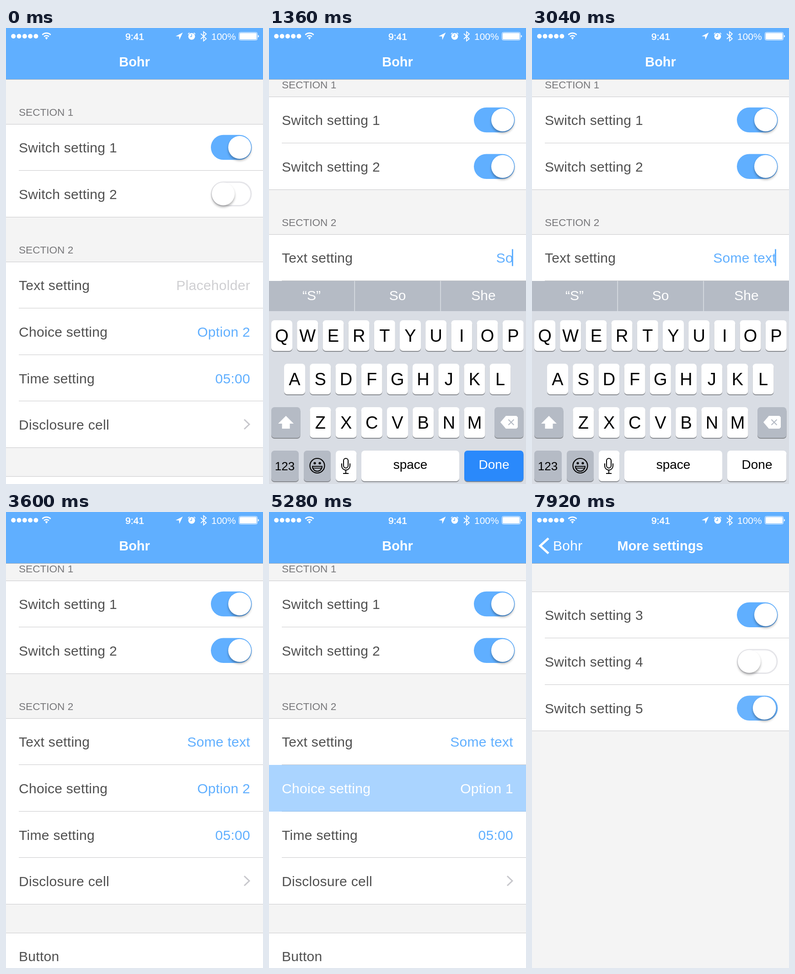
Animation, 562 px wide and 997 px high, one loop 8000 ms. Source, as an HTML page with a canvas:

```html
<!DOCTYPE html>
<html lang="en">
<head>
<meta charset="utf-8">
<title>Settings</title>
<style>
  html, body { margin: 0; height: 100%; overflow: hidden; background: #f4f4f4; }
  canvas { display: block; width: 100vw; height: 100vh; }
</style>
</head>
<body>
<canvas id="stage" width="562" height="997"></canvas>
<script>
const W = 562, H = 997, LOOP = 8000, ROW = 101.5;
const BLUE = '#60afff', INK = '#505050', LINE = '#c9c9cb', PALE = '#f4f4f4', GREY = '#b5bbc5';
const c = document.getElementById('stage').getContext('2d');

// --- timing helpers ---
const clamp = v => Math.max(0, Math.min(1, v));
const mix = (a, b, p) => a + (b - a) * p;
const smooth = (t, a, b) => { const p = clamp((t - a) / (b - a)); return p * p * (3 - 2 * p); };
const spring = (t, start) => { const x = Math.max(0, t - start) * .0194; return 1 - (1 + x) * Math.exp(-x); };

// --- drawing helpers ---
function rect(x, y, w, h, fill) { c.fillStyle = fill; c.fillRect(x, y, w, h); }
function round(x, y, w, h, r, fill) {
  c.beginPath(); c.roundRect(x, y, w, h, r); c.fillStyle = fill; c.fill();
}
function disc(x, y, r, fill) { c.beginPath(); c.arc(x, y, r, 0, 7); c.fillStyle = fill; c.fill(); }
function path(pts, color, width) {
  c.beginPath();
  pts.forEach(([x, y]) => c.lineTo(x, y));
  if (width) { c.strokeStyle = color; c.lineWidth = width; c.stroke(); }
  else { c.fillStyle = color; c.fill(); }
}
function arc(x, y, r, a, b, color, width) {
  c.beginPath(); c.arc(x, y, r, a, b); c.strokeStyle = color; c.lineWidth = width; c.stroke();
}
function text(s, x, y, size, color, align = 'left', weight = '', gap = 0) {
  c.font = `${weight} ${size}px "Liberation Sans", Arial, sans-serif`;
  c.letterSpacing = gap + 'px';
  c.textAlign = align;
  c.fillStyle = color;
  c.fillText(s, x, y);
}
function shadow(blur, y, color) { c.shadowBlur = blur; c.shadowOffsetY = y; c.shadowColor = color; }
const noShadow = () => shadow(0, 0, 'transparent');

// --- table parts ---
function toggle(y, from, t, tap) {
  const p = mix(from, 1 - from, spring(t, tap + 100));
  const press = smooth(t, tap, tap + 120) * (1 - spring(t, tap + 100));
  const x = 448, top = y - 27, w = 89.5, h = 54.5;
  round(x, top, w, h, h / 2, `rgb(${mix(229, 96, p)},${mix(229, 175, p)},${mix(233, 255, p)})`);
  const k = (1 - p) * (1 - press);
  if (k > .01) {
    const iw = (w - 6) * k, ih = (h - 6) * k;
    round(x + w / 2 - iw / 2, top + h / 2 - ih / 2, iw, ih, ih / 2, '#fff');
  }
  const stretch = 12 * press;
  shadow(5, 4, 'rgba(0,0,0,.3)');
  round(mix(450, 486, p) - stretch * p, y - 24.8, 50 + stretch, 50, 25, '#fff');
  noShadow();
}

function group(top, count) {
  rect(0, top, W, count * ROW, '#fff');
  for (let i = 0; i <= count; i++) {
    const x = i && i < count ? 28 : 0;
    rect(x, Math.floor(top + i * ROW), W, 1, LINE);
  }
}

const label = (s, y, color = INK) => text(s, 28, y + 10.5, 30, color, 'left', '', .3);
const value = (s, y, color = BLUE) => text(s, 534, y + 10.5, 30, color, 'right', '', .3);
const heading = (s, y) => text(s, 28, y, 22.6, '#77777a');

function highlight(y, alpha) {
  c.globalAlpha = alpha;
  rect(0, y - 51, W, 102, BLUE);
  c.globalAlpha = 1;
}

// --- typing ---
const WORDS = 'Some text', KEY_HOLD = 110;
const keyDown = i => 1030 + 200 * i;
const typedCount = t => [...WORDS].filter((_, i) => t >= keyDown(i) + KEY_HOLD).length;
function pressedKey(t) {
  const i = [...WORDS].findIndex((_, i) => t >= keyDown(i) && t < keyDown(i) + KEY_HOLD);
  return i < 0 ? '' : WORDS[i].toUpperCase();
}

function mainPage(t) {
  rect(0, 0, W, 1200, PALE);
  heading('SECTION 1', 192);
  group(210, 2);
  label('Switch setting 1', 261);
  toggle(260.8, 1, t, LOOP * 2);
  label('Switch setting 2', 363);
  toggle(362.5, 0, t, 60);

  heading('SECTION 2', 493);
  group(511, 4);
  label('Text setting', 562);
  const typed = WORDS.slice(0, typedCount(t));
  value(typed || 'Placeholder', 562, typed ? BLUE : '#cfcfd2');
  if (t >= 700 && t < 3160) rect(531, 543.5, 3, 37, BLUE);

  const tap = t < 5000 ? 4240 : 5120;
  const lit = t >= tap && t < tap + 540;
  if (lit) highlight(664, 1 - spring(t, tap + 80));
  const option = t < 4300 ? 2 : t < 5180 ? 3 : 1;
  label('Choice setting', 664, lit ? '#fff' : INK);
  value('Option ' + option, 664, lit ? '#fff' : BLUE);

  label('Time setting', 766);
  value('05:00', 766);

  const chosen = t >= 6080;
  if (chosen) highlight(867, 1);
  label('Disclosure cell', 867.5, chosen ? '#fff' : INK);
  path([[521, 856], [532, 866.5], [521, 877]], '#c7c7cc', 3);

  group(980, 2);
  label('Button', 1031);
}

function morePage(t) {
  rect(0, 0, W, H, PALE);
  group(174, 3);
  [[1, LOOP * 2], [1, 7180], [0, 7595]].forEach(([on, tap], i) => {
    const y = 225 + i * 102;
    label('Switch setting ' + (i + 3), y);
    toggle(y - .5, on, t, tap);
  });
}

// --- keyboard (coordinates for its resting place, top at 553) ---
const KEYS = {};
[['QWERTYUIOP', 5, 639], ['ASDFGHJKL', 33, 734], ['ZXCVBNM', 89.4, 829]].forEach(([row, x, y]) =>
  [...row].forEach((k, i) => KEYS[k] = [x + i * 56.2, y]));

function key(x, y, w, fill) {
  round(x, y + 2, w, 67, 7, '#898c91');
  round(x, y, w, 67, 7, fill);
}

function popup(k) {
  const [x, y] = KEYS[k], m = x + 23, top = y - 111;
  c.beginPath();
  c.moveTo(m - 45.5, top + 14);
  c.quadraticCurveTo(m - 45.5, top, m - 31, top);
  c.lineTo(m + 31, top);
  c.quadraticCurveTo(m + 45.5, top, m + 45.5, top + 14);
  c.lineTo(m + 45.5, y - 43);
  c.bezierCurveTo(m + 45.5, y - 20, m + 23, y - 22, m + 23, y + 4);
  c.lineTo(m + 23, y + 61);
  c.quadraticCurveTo(m + 23, y + 68, m + 16, y + 68);
  c.lineTo(m - 16, y + 68);
  c.quadraticCurveTo(m - 23, y + 68, m - 23, y + 61);
  c.lineTo(m - 23, y + 4);
  c.bezierCurveTo(m - 23, y - 22, m - 45.5, y - 20, m - 45.5, y - 43);
  c.closePath();
  shadow(14, 5, 'rgba(0,0,0,.35)');
  c.fillStyle = '#fff';
  c.fill();
  noShadow();
  text(k, m, y - 36, 71, '#000', 'center');
  c.strokeStyle = '#fff';
  c.lineWidth = 1.6;
  c.strokeText(k, m, y - 36);
}

function keyboard(t) {
  const held = pressedKey(t), started = typedCount(t) > 0;
  rect(0, 553, W, 444, '#d9dde4');
  rect(0, 553, W, 66, GREY);
  rect(186.5, 553, 1.2, 66, '#e6e9ed');
  rect(374.5, 553, 1.2, 66, '#e6e9ed');
  (started ? ['“S”', 'So', 'She'] : ['I', 'The', "I'm"]).forEach((s, i) =>
    text(s, 93 + i * 188, 594.5, 30, '#fff', 'center'));

  for (const k in KEYS) {
    const [x, y] = KEYS[k];
    key(x, y, 46, '#fff');
    text(k, x + 23, y + 47, 38, '#000', 'center');
  }

  key(5, 829, 63.5, started ? GREY : '#fff');
  path([[37, 848], [54, 865], [45.5, 865], [45.5, 876], [28.5, 876], [28.5, 865], [20, 865]], started ? '#fff' : '#000');
  key(493, 829, 63.5, GREY);
  path([[506, 862], [518, 848], [541, 848], [544, 851], [544, 873], [541, 876], [518, 876]], '#fff');
  path([[523.5, 856], [535.5, 868]], GREY, 2.2);
  path([[535.5, 856], [523.5, 868]], GREY, 2.2);

  key(5, 924, 60, GREY);
  text('123', 34.5, 967, 26, '#000', 'center');

  key(76, 924, 59, GREY);
  arc(105.5, 957, 16, 0, 7, '#000', 2.2);
  disc(100, 951.5, 2.6, '#000');
  disc(111, 951.5, 2.6, '#000');
  c.beginPath(); c.arc(105.5, 958.5, 10.5, 0, Math.PI); c.closePath();
  c.lineWidth = 2; c.stroke();
  path([[97, 962.5], [114, 962.5]], '#000', 1.6);

  key(146, 924, 45.5, '#fff');
  c.beginPath(); c.roundRect(163, 941, 10, 21, 5);
  c.lineWidth = 2; c.stroke();
  arc(168, 957.5, 9, 0, Math.PI, '#000', 2);
  path([[159, 952], [159, 958]], '#000', 2);
  path([[177, 952], [177, 958]], '#000', 2);
  path([[168, 966], [168, 974]], '#000', 2);
  path([[162, 974], [174, 974]], '#000', 2);

  key(202, 924, 214, held === ' ' ? GREY : '#fff');
  text('space', 309, 964, 28, '#000', 'center');

  const done = t >= 3040 && t < 3160;
  key(427, 924, 129.5, done ? '#fff' : '#2a89fb');
  text('Done', 492, 964, 28, done ? '#000' : '#fff', 'center');
  if (KEYS[held]) popup(held);
}

// --- bars ---
function statusBar() {
  for (let i = 0; i < 5; i++) disc(16.2 + i * 12.3, 18, 5, '#fff');
  for (const r of [7.5, 12.8]) arc(88.5, 24, r, -2.36, -.78, '#fff', 2.7);
  c.beginPath(); c.moveTo(88.5, 25.5); c.arc(88.5, 24, 4, -2.4, -.74); c.fillStyle = '#fff'; c.fill();
  text('9:41', 281.5, 25.5, 21, '#fff', 'center');
  c.strokeStyle = '#fff'; c.lineWidth = .6; c.strokeText('9:41', 281.5, 25.5);

  path([[386.5, 10], [371, 18], [378.5, 18.5], [379, 26]], '#fff');
  disc(406, 18.3, 7.4, '#fff');
  path([[406, 13.5], [406, 18.8], [402.5, 18.8]], BLUE, 1.4);
  arc(406, 18.3, 9.2, -2.6, -2.1, '#fff', 1.6);
  arc(406, 18.3, 9.2, -1.04, -.54, '#fff', 1.6);
  path([[426, 12.5], [438, 23.5], [432, 28.5], [432, 8], [438, 13], [426, 24]], '#fff', 1.7);
  text('100%', 449, 25.5, 21, '#fff');
  c.beginPath(); c.roundRect(509.5, 9.5, 40, 17, 3);
  c.strokeStyle = '#fff'; c.lineWidth = 1; c.stroke();
  round(511, 11, 37, 14, 1.5, '#fff');
  c.beginPath(); c.arc(550.5, 18, 2.6, -1.4, 1.4); c.fillStyle = '#fff'; c.fill();
}

function navBar(t, push) {
  const left = 1 - push;
  rect(0, 0, W, 112, BLUE);
  rect(0, 112, W, 1, '#a9b0b8');
  statusBar();
  if (left > 0) {
    c.globalAlpha = left;
    text('Bohr', 281 - 200 * push, 84, 28.9, '#fff', 'center', 'bold');
  }
  if (push > 0) {
    c.globalAlpha = push;
    text('More settings', 280.5 + 253 * left, 84, 28.9, '#fff', 'center', 'bold');
    text('Bohr', 46 + 84 * left, 84, 30, '#fff', 'left', '', .3);
    c.globalAlpha = clamp((t - 6130) / 520);
    path([[36, 57.5], [18, 74], [36, 90.5]], '#fff', 5);
  }
  c.globalAlpha = 1;
}

function at(x, y, draw, t) {
  c.save();
  c.translate(Math.round(x), Math.round(y));
  draw(t);
  c.restore();
}

function render(t) {
  const push = t >= 6720 ? 1 : spring(t, 6135);
  if (push < 1) {
    at(-.3 * W * push, -60 * smooth(t, 720, 975), mainPage, t);
    rect(0, 0, W, H, `rgba(0,0,0,${.08 * push})`);
  }
  if (push > 0) at(W * (1 - push), 0, morePage, t);
  if (t > 640 && t < 3600) {
    const shown = spring(t, 640) - spring(t, 3160);
    at(0, 444 * (1 - shown), keyboard, t);
  }
  navBar(t, push);
}

function tick(now) {
  render(now % LOOP);
  requestAnimationFrame(tick);
}
render(0);
requestAnimationFrame(tick);
</script>
</body>
</html>
```
